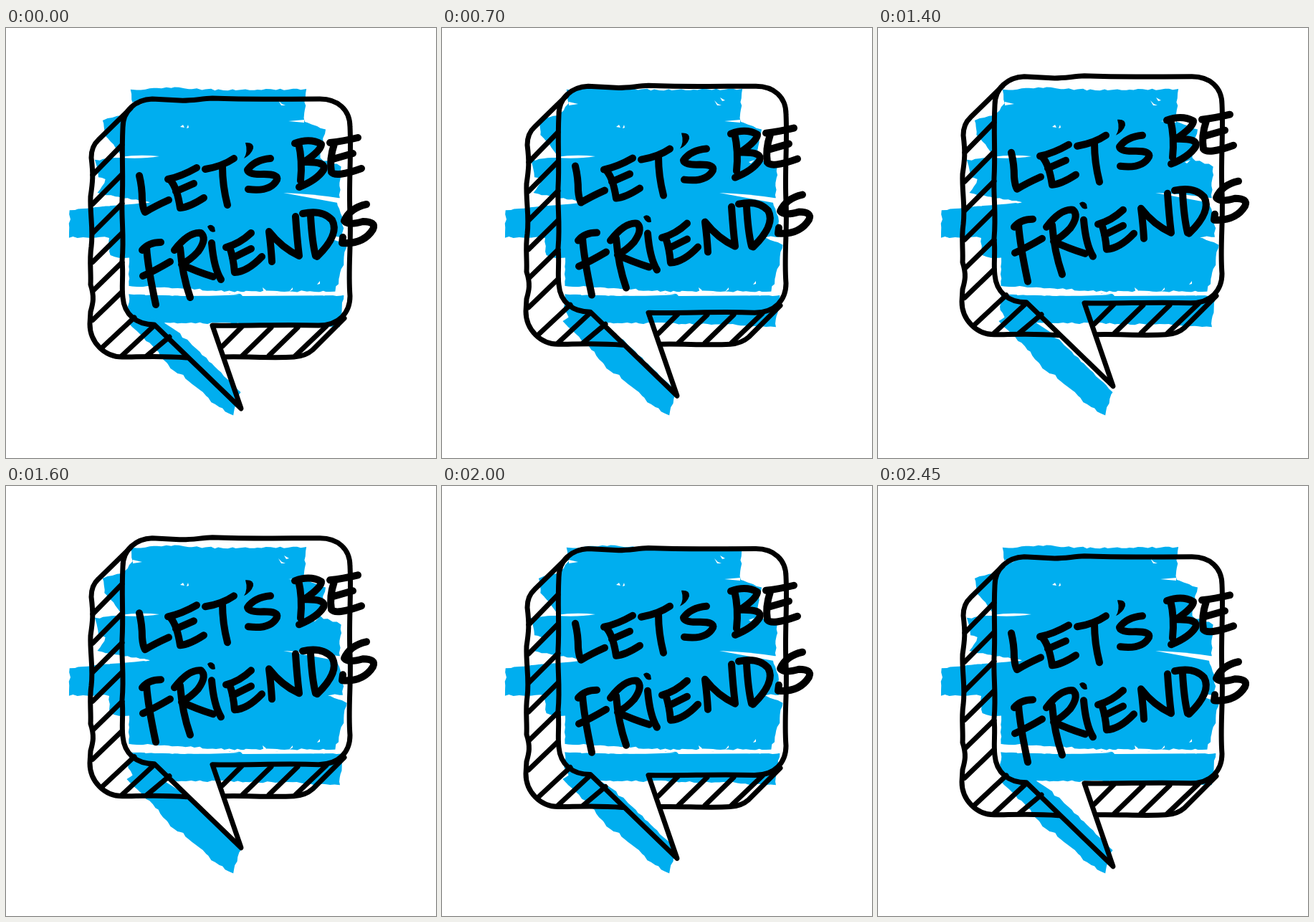
An HTML page with a canvas for the animation above (2.5 s loop, 600 by 600 pixels).

```html
<!DOCTYPE html>
<html lang="en">
<head>
<meta charset="utf-8">
<title>Let's be friends</title>
<style>
html, body { margin: 0; width: 100%; height: 100%; overflow: hidden; background: #fff; }
canvas { display: block; width: 600px; height: 600px; }
</style>
</head>
<body>
<canvas id="stage" width="600" height="600"></canvas>
<script>
const ctx = document.getElementById('stage').getContext('2d');
const LOOP = 2500, STEP = 50, RISE = 32.5;
const BLUE = '#00aeef';

// Dry-brush swaths, each a ragged polygon
const swaths = [
  [175,86, 230,83, 285,86, 418,86, 416,131, 445,142, 438,182, 468,193, 465,238, 462,243,
   470,263, 470,291, 448,291, 475,302, 469,335, 460,367, 330,368, 172,360, 171,321, 145,318,
   144,292, 88,292, 89,254, 126,249, 200,243, 128,231, 139,211, 130,209, 124,185, 164,180,
   138,150, 136,128, 162,122, 177,106],
  [172,371, 250,374, 330,371, 472,373, 468,396, 465,418, 405,414, 300,412, 180,411, 171,393],
  [168,410, 184,397, 218,408, 252,435, 327,507, 316,541, 292,525, 270,505, 247,484, 238,483, 205,444]
];
// Gaps left by the brush
const streaks = [
  'M160 180 Q185 176 214 179 Q190 183 160 181Z',
  'M122 231 Q160 238 201 243 Q180 246 118 250 L140 243Z',
  'M387 230 Q425 231 470 238 L463 244 Q425 237 387 230Z',
  'M168 360 Q240 365 326 372 Q270 376 170 371Z',
  'M325 368 L385 371 L475 367 L475 373 L330 374Z',
  'M177 103 l13 3 -13 2Z M380 101 l5 5 5 2 -6 0Z M388 97 l7 4 -4 1Z',
  'M243 138 l4 -3 2 4Z M252 140 l2 -5 1 4Z M416 132 l-22 -2 22 -2Z',
  'M358 362 l5 4 -3 4Z M395 368 l5 -6 0 3Z M434 358 l4 -5 0 4Z M428 187 l8 -3 -5 5Z'
];

const outline = [
  'M288 415 C340 416 385 413 436 415 C465 415 480 397 480 374 C477 335 482 300 480 260 ' +
  'C478 215 482 180 480 138 C480 114 463 99 438 99 C385 99 340 100 288 98 C270 99 255 102 242 101 ' +
  'L204 99 C181 100 163 115 163 139 C161 180 164 205 162 240 C161 270 165 290 162 325 ' +
  'C164 345 161 360 163 376 C165 400 182 414 207 414 L328 531 Z',
  'M174 112 L129 156 Q119 165 119 181 C122 205 121 215 118 235 C117 260 122 280 119 305 ' +
  'C116 325 119 340 118 358 C124 376 121 385 118 396 L117 413 C117 439 138 459 162 459 ' +
  'C185 459 215 457 252 460',
  'M304 459 C335 458 370 461 402 459 Q418 458 428 449 L472 405'
];
const bottomHatch = [
  'M134 446 L179 404', 'M162 457 L206 416', 'M197 457 L228 431',
  'M302 444 L329 417', 'M330 457 L370 418', 'M367 457 L407 418', 'M404 457 L447 416'
];
const sideHatch = Array.from({ length: 6 }, (_, i) => `M121 ${205 + 40.5 * i} L162 ${163 + 41 * i}`);
const bubble = [...outline, ...sideHatch, ...bottomHatch].map(d => new Path2D(d));

// Hand lettering, one entry per glyph
const glyphs = [
  'M186 206 Q190 222 190 240 Q191 252 194 257 Q207 249 227 240',
  'M226 211 Q245 207 266 195 M230 213 Q239 224 243 251 Q256 250 276 237 M237 228 L262 217',
  'M278 197 Q302 193 318 182 M302 193 Q302 220 309 247',
  'M369 182 Q347 184 337 198 Q338 205 360 204 Q381 204 378 212 Q369 229 338 225',
  'M403 161 Q424 153 440 162 Q441 170 416 187 Q448 186 443 198 Q434 212 409 222 M408 160 Q414 185 411 213',
  'M452 160 Q470 158 491 153 M458 162 Q451 183 454 201 Q460 209 496 196 M456 183 L484 175',
  'M190 310 Q199 299 216 299 M196 306 Q198 335 209 386 M191 346 Q207 339 229 326',
  'M235 310 Q255 284 272 286 Q281 294 268 312 Q258 323 245 330 Q266 340 289 347 M243 307 Q246 345 257 376',
  'M287 300 Q290 335 300 351',
  'M307 306 Q326 301 342 286 M312 306 Q317 319 319 341 Q337 340 357 319 M316 321 L342 308',
  'M371 326 Q370 307 367 284 Q385 307 409 318 Q406 293 404 263',
  'M414 259 Q441 253 455 268 Q466 288 434 319 M425 262 Q427 298 432 318',
  'M503 246 Q480 251 472 269 Q477 276 498 270 Q517 270 512 281 Q499 302 469 300 L470 292'
].map(d => new Path2D(d));
const marks = new Path2D('M334 160 Q346 159 345 168 Q342 177 332 182 Q338 173 334 160Z ' +
  'M281 277 Q286 272 291 278 L292 284 Q285 287 281 277Z');

function seeded(seed) {
  return () => (seed = (seed * 16807) % 2147483647) / 2147483647;
}

function raggedPath(points, random) {
  const path = new Path2D();
  const jitter = () => (random() - 0.5) * 2.6;
  for (let i = 0; i < points.length; i += 2) {
    const [x, y] = [points[i], points[i + 1]];
    const nx = points[(i + 2) % points.length], ny = points[(i + 3) % points.length];
    const count = Math.max(1, Math.round(Math.hypot(nx - x, ny - y) / 6));
    for (let k = 0; k < count; k++) {
      path.lineTo(x + (nx - x) * k / count + jitter(), y + (ny - y) * k / count + jitter());
    }
  }
  path.closePath();
  return path;
}
const random = seeded(41);
const paint = swaths.map(points => raggedPath(points, random));
const gaps = streaks.map(d => new Path2D(d));

function ease(t, start, end) {
  const u = Math.min(1, Math.max(0, (t - start) / (end - start)));
  return u * u * (3 - 2 * u);
}
const bubbleLift = t => -RISE * (ease(t, 190, 1150) - ease(t, 1250, 2500));
const textLift = t => -RISE * (ease(t, 250, 1270) - ease(t, 1340, 2560));

function strokeAll(paths, width, lift) {
  ctx.save();
  ctx.translate(0, lift);
  ctx.lineWidth = width;
  paths.forEach(path => ctx.stroke(path));
  ctx.restore();
}

function draw(t) {
  ctx.fillStyle = '#fff';
  ctx.fillRect(0, 0, 600, 600);
  ctx.fillStyle = BLUE;
  paint.forEach(path => ctx.fill(path));
  ctx.fillStyle = '#fff';
  gaps.forEach(path => ctx.fill(path));

  ctx.strokeStyle = ctx.fillStyle = '#000';
  ctx.lineCap = ctx.lineJoin = 'round';
  strokeAll(bubble, 7, bubbleLift(t));
  strokeAll(glyphs, 10, textLift(t));
  ctx.save();
  ctx.translate(0, textLift(t));
  ctx.fill(marks);
  ctx.restore();
}

const origin = performance.now();
function tick() {
  const t = (performance.now() - origin) % LOOP;
  draw(Math.floor(t / STEP) * STEP);
  requestAnimationFrame(tick);
}
tick();
</script>
</body>
</html>
```
